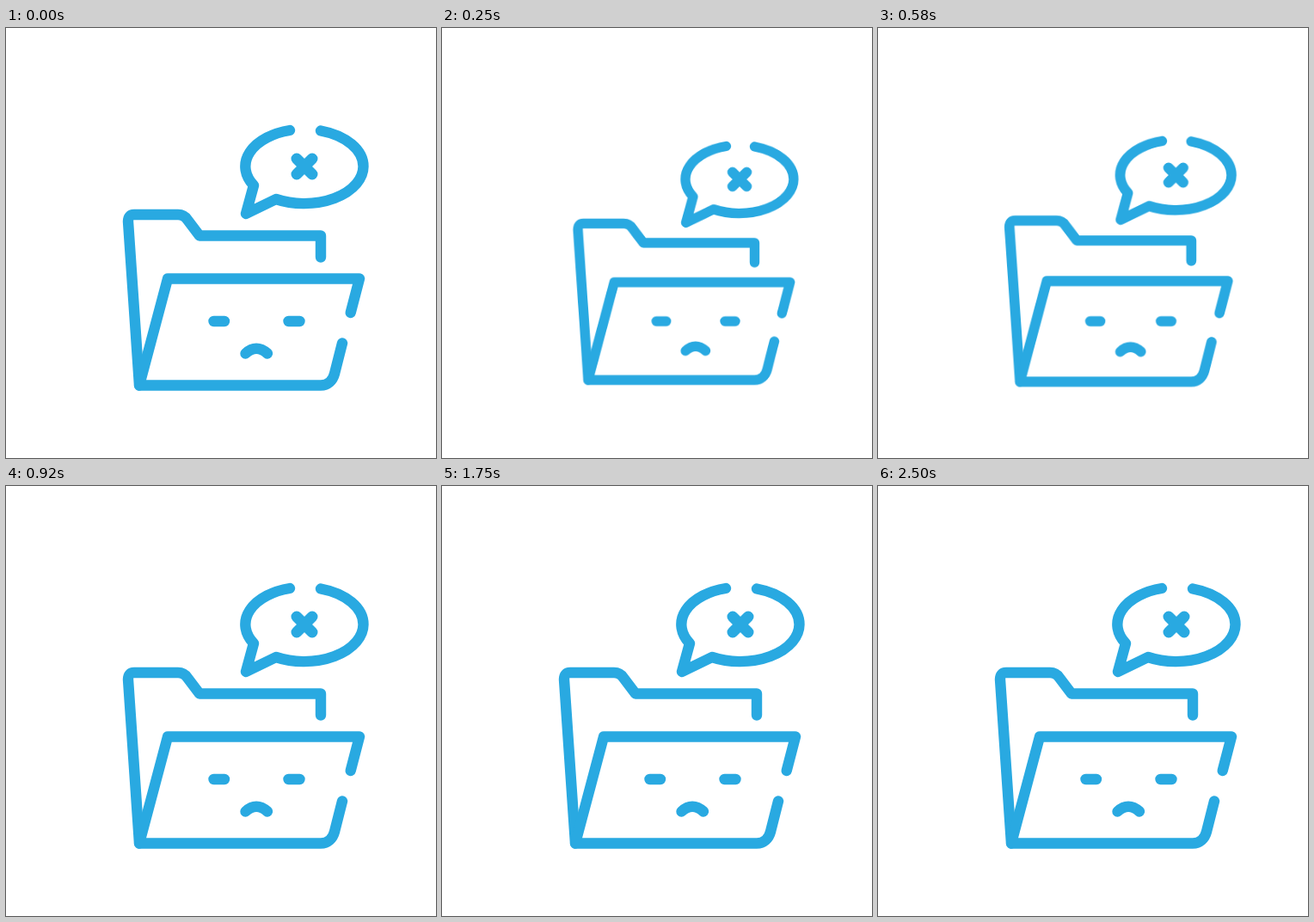
An HTML page without scripts for the animation above (2580 ms loop, 500 px wide and 500 px high).

```html
<!DOCTYPE html>
<html lang="en">
<head>
<meta charset="utf-8">
<title>Sad folder</title>
<style>
  html, body { margin: 0; width: 100%; height: 100%; overflow: hidden; background: #fff; }
  svg { display: block; width: 100%; height: 100%; }
  .folder {
    fill: none;
    stroke: #29a9e1;
    stroke-width: 12.4;
    stroke-linecap: round;
    stroke-linejoin: round;
    transform-origin: 335px 341px;
    animation: shrink 2580ms step-end infinite;
  }
  /* One dip in size on a 12 fps beat, then a rest */
  @keyframes shrink {
    0% { transform: scale(1); }
    3.1% { transform: scale(.996); }
    6.589% { transform: scale(.966); }
    9.69% { transform: scale(.917); }
    12.79% { transform: scale(.88); }
    16.279% { transform: scale(.871); }
    19.38% { transform: scale(.896); }
    22.48% { transform: scale(.944); }
    25.969% { transform: scale(.983); }
    29.07%, 100% { transform: scale(1); }
  }
</style>
</head>
<body>
<svg viewBox="0 0 500 500">
  <g class="folder">
    <!-- back and front covers -->
    <path d="M366 266.5V241.5H225L211 223Q207 217 200 217H149Q142 217 142 225L155 415.5"/>
    <path d="M400.7 331L411 291.5H188L155 415.5H366C374 415.5 380 410 382 402L391 366.5"/>
    <!-- face -->
    <path d="M241.5 341H254M328.5 341H341.5M278.5 378.5Q291 367 304 378.5"/>
    <!-- speech bubble -->
    <path d="M330 119A69 43.3 0 0 0 288 183L279 216L314 199A69 43.3 0 0 0 415.5 161A69 43.3 0 0 0 366 119.5"/>
    <path d="M338 152L356 170M356 152L338 170" stroke-width="13"/>
  </g>
</svg>
</body>
</html>
```
